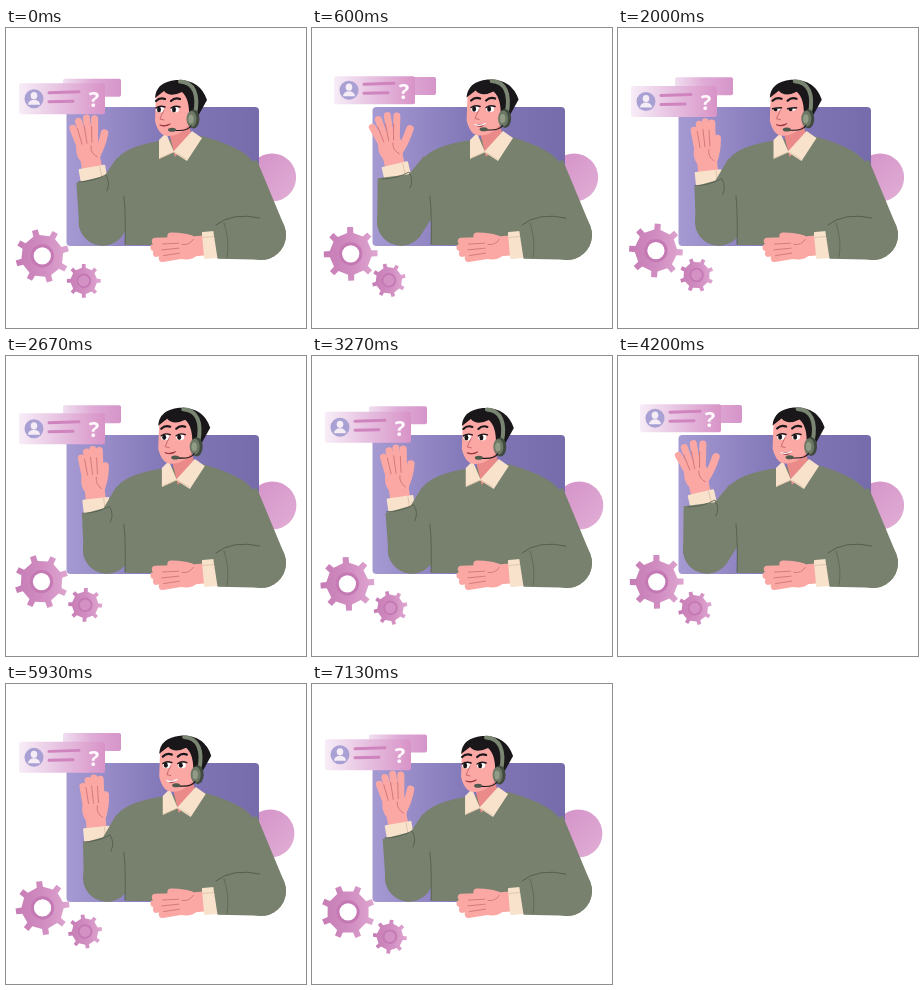
Recreate the animation shown at these times as an HTML page with a canvas. Size 300 by 300 pixels, loop 7190 ms.

```html
<!DOCTYPE html>
<html lang="en">
<head>
<meta charset="utf-8">
<title>Support agent</title>
<style>
html, body { margin: 0; width: 100%; height: 100%; overflow: hidden; background: #fff; }
canvas { display: block; width: 100vw; height: 100vh; }
</style>
</head>
<body>
<canvas id="stage"></canvas>
<script>
const canvas = document.getElementById('stage');
const c = canvas.getContext('2d');
const LOOP = 7190, CYCLE = LOOP / 2, TURN = 2 * Math.PI;
const SKIN = '#fba8a5', SHADE = '#ea8b8a', LINE = '#c8696e';
const CREAM = '#f8e2cc', SEAM = '#dcc0a4', INK = '#19171a', FOLD = '#525b4c';

const lerp = (a, b, k) => a + (b - a) * k;
const wave = (t, peak) => Math.cos((t - peak) / CYCLE * TURN);

// Eased value from [time, value] pairs, repeating every cycle.
function key(t, ...stops) {
  stops.push([CYCLE, stops[0][1]]);
  const i = stops.findIndex(s => s[0] > t);
  const [t0, a] = stops[i - 1], [t1, b] = stops[i];
  const k = (t - t0) / (t1 - t0);
  return lerp(a, b, k * k * (3 - 2 * k));
}

function gradient(x0, y0, x1, y1, ...colors) {
  const g = c.createLinearGradient(x0, y0, x1, y1);
  colors.forEach((col, i) => g.addColorStop(i / (colors.length - 1), col));
  return g;
}

function fill(path, color) {
  c.fillStyle = color;
  c.fill(new Path2D(path));
}

function stroke(path, color, width) {
  c.strokeStyle = color;
  c.lineWidth = width;
  c.stroke(new Path2D(path));
}

function oval(x, y, rx, ry, color) {
  c.beginPath();
  c.ellipse(x, y, rx, ry, 0, 0, TURN);
  c.fillStyle = color;
  c.fill();
}

function box(x, y, w, h, r, color) {
  c.beginPath();
  c.roundRect(x, y, w, h, r);
  c.fillStyle = color;
  c.fill();
}

function placed(x, y, angle, paint) {
  c.save();
  c.translate(x, y);
  c.rotate(angle);
  paint();
  c.restore();
}

// Tapered limb: flat at the first end, round at the second.
function limb(x0, y0, r0, x1, y1, r1, color) {
  placed(x0, y0, Math.atan2(y1 - y0, x1 - x0), () => {
    c.beginPath();
    c.moveTo(0, r0);
    c.lineTo(0, -r0);
    c.arc(Math.hypot(x1 - x0, y1 - y0), 0, r1, -TURN / 4, TURN / 4);
    c.fillStyle = color;
    c.fill();
  });
}

function gear(x, y, r, turn, hole) {
  placed(x, y, 0, () => {
    c.beginPath();
    for (let i = 0; i < 32; i++) {
      const edge = i % 4;
      const a = turn + (Math.floor(i / 4) + [-.19, -.14, .14, .19][edge]) * TURN / 8;
      const d = edge % 3 ? r : r * .78;
      c.lineTo(Math.cos(a) * d, Math.sin(a) * d);
    }
    c.closePath();
    c.fillStyle = gradient(-r, 0, r, 0, '#c67cb5', '#d08cc0', '#dfa6d1');
    c.fill();
    oval(0, 0, r * .43, r * .43, '#c579b4');
    oval(0, 0, r * .32, r * .32, hole);
  });
}

function cards(t) {
  const up = key(t, [0, 0], [605, 1], [1050, 0]);
  const shrink = key(t, [0, 0], [650, 0], [1100, 1], [1400, 1], [1850, 0]);
  const bx = 57 + 3 * up, bw = 58 + 6 * up;
  box(bx, 50 - 2 * up - wave(t, 2300), bw, 18, 2,
    gradient(bx, 0, bx + bw, 0, '#f0dff0', '#dfabd6', '#d594c8'));

  const x = 13 + 9 * up + 15 * shrink, w = 86 - 5 * up - 30 * shrink;
  const y = 56.5 + 1.5 * wave(t, 2100) - 7 * up - 3 * shrink, h = 31 - 3 * up;
  box(x, y, w, h, 2, gradient(x, 0, x + w, 0, '#f7edf7', '#e6bfe0', '#d893c7'));
  placed(x, y + h / 2, 0, () => {
    c.globalAlpha = 1 - shrink;
    oval(15, 0, 9.5, 9.5, '#a9a0d3');
    oval(15, -3, 3.3, 3.6, '#f6ecf6');
    fill('M9 6A6 5 0 0 1 21 6Z', '#f6ecf6');
    stroke('M30 -6L60 -7M30 3L54 2.5', '#cf84be', 3);
    c.fillStyle = '#fff8fd';
    c.font = 'bold 22px "Open Sans", "Liberation Sans", sans-serif';
    c.textAlign = 'center';
    c.fillText('?', w - 11, 8.5);
  });
}

// Hand pointing up from its wrist; spread opens the fingers and thumb.
function hand(x, y, tilt, spread) {
  placed(x, y, tilt, () => {
    oval(0, -23, 12.5, 15, SKIN);
    box(-10, -20, 20, 22, 2, SKIN);
    stroke(`M7 -17Q${11 + 4 * spread} -24 ${12 + 11 * spread} -37`, SKIN, 7.5);
    for (let i = 0; i < 4; i++) {
      const a = (i - 1.6) * lerp(.05, .2, spread), len = 24 - 1.8 * (i - 2) ** 2;
      const bx = -8 + 5 * i, tx = bx + Math.sin(a) * len, ty = -31 - Math.cos(a) * len;
      stroke(`M${bx} -29L${tx} ${ty}`, SKIN, 7);
      if (i) stroke(`M${bx - 2.5} -30L${lerp(bx, tx, .7) - 3} ${lerp(-30, ty, .7)}`, LINE, .7);
    }
    stroke('M7 -15Q1 -20 3 -27', LINE, .7);
    box(-13.5, -6, 27, 16, 1, CREAM);
    stroke('M8 -5V9', SEAM, .8);
  });
}

function leftArm(t, wool) {
  const s = key(t, [0, .6], [605, 1], [1130, .93], [2000, .05], [2335, 0], [3270, .32]);
  const x = lerp(91, 84, s), y = lerp(149, 142, s);
  const ex = lerp(101, 89, s * s), ey = 193.5;
  hand(x, y, lerp(-.1, -.23, s), s);
  limb(128, 140, 20, ex, ey, 24, wool);
  limb(x - .5, y + 6, lerp(14, 18, s), ex, ey, 24, wool);
  stroke(`M${x - 14} ${y + 9}Q${x} ${y + 9} ${x + 13} ${y + 2}q5 8 1 16`, FOLD, .8);
}

function rightArm(t, wool) {
  const r = key(t, [0, 0], [680, 0], [1080, 1], [1350, 1], [1800, 0]);
  const x = lerp(203, 208, r), y = lerp(217, 207, r);
  const ex = 255 + 3 * r, ey = 207;
  hand(x, y, lerp(-1.66, -1.45, r), .35 * r);
  limb(231, 139, 21, ex, ey, 25, wool);
  limb(x + 6, y - 3, 17, ex, ey, 25, wool);
  stroke(`M${x + 7} ${y - 20}Q${x + 23} ${y - 33} 254 190`, FOLD, .9);
  stroke(`M${x + 15} ${y - 22}q6 18 3 34`, FOLD, .6);
}

function collar() {
  fill('M161 96H183L186 110L169 129Z', SHADE);
  fill('M160 105L153 112V131L168 124Z', CREAM);
  fill('M186 103L196 110L181 133L167 124Z', CREAM);
  stroke('M154 130L168 124L180 131', SEAM, .8);
}

function head(t, turn) {
  fill('M150 64L149 93Q153 109 163 108Q178 107 185 92V60Z', SKIN);
  fill('M149 70Q150 54 170 52Q194 51 201 72L191 90H183Q184 71 176 64Q164 70 158 63Z', INK);

  const lid = key(t, [0, 0], [1600, 0], [1950, 1], [2080, 1], [2250, 0]);
  const open = key(t, [0, 0], [605, .5], [850, .3], [1130, 1], [1450, .4], [1900, 0], [2335, .4], [2900, 0]);
  placed(turn * 3.5, 0, 0, () => {
    for (const x of [154, 169]) {
      stroke(`M${x - 4} 73Q${x} 69 ${x + 5} 71`, INK, 2.2);
      oval(x, 81.5, 4, 3 - 1.5 * lid, '#fff');
      oval(x - 1, 81.5 + lid / 2, 2, 2.7 - 1.3 * lid, INK);
      stroke(`M${x - 4} ${80 + lid}Q${x} ${77 + 3 * lid} ${x + 5} ${79 + lid}`, INK, 1.4);
    }
    stroke('M158 82Q155 88 154 91L158 92', LINE, 1);
    fill(`M154 97Q158 ${98 - 2 * open} 164 96Q160 ${100 + 5 * open} 154 97Z`, '#9c3945');
    stroke('M154 97Q159 99 164 96', open > .2 ? '#fff' : '#9c3945', 1.2);
  });

  stroke('M174 53.5C188 54 193 67 189 86', '#7b8672', 4);
  oval(187.5, 91, 6, 9.5, '#414a3f');
  oval(185.5, 91, 5, 8, '#6c7764');
  oval(185, 91, 2.7, 4.5, '#919b86');
  stroke('M185 98Q181 104 166 102', INK, 1.2);
  oval(166, 101.7, 4, 2, '#4f594c');
}

function draw(now) {
  const t = now % CYCLE;
  const scale = devicePixelRatio || 1;
  const w = Math.round(innerWidth * scale), h = Math.round(innerHeight * scale);
  if (canvas.width !== w || canvas.height !== h) { canvas.width = w; canvas.height = h; }
  c.setTransform(w / 300, 0, 0, h / 300, 0, 0);
  c.clearRect(0, 0, 300, 300);
  c.lineCap = c.lineJoin = 'round';

  // The wool is flat so that it stays even across the turned limbs.
  const wool = '#77816d';
  const turn = key(t, [0, 0], [605, 1], [1300, 1], [2000, .5], [2335, .75], [3270, .15]);
  const spin = t / CYCLE * TURN;

  const cx = 263.5 + 4 * wave(t, 3100);
  oval(cx, 149.5, 24, 24, gradient(cx - 20, 130, cx + 20, 170, '#d493c8', '#e0acd5'));
  box(60.5, 79, 192.5, 139, 4, gradient(60, 0, 253, 0, '#a59ad2', '#8378b8', '#766cac'));
  cards(t);
  gear(37.5 - 2.4 * wave(t, 3000), 225 + 3 * wave(t, 3450), 27, spin + .5, '#fff');
  gear(78 + 1.2 * wave(t, 2600), 250 + 3 * wave(t, 200), 17, -spin, '#d391c4');

  leftArm(t, wool);
  fill('M153 113Q110 120 107 140L119 172V217H235L250 140Q246 122 196 108Z', wool);
  stroke('M118 168Q120 190 119 216', FOLD, .8);
  rightArm(t, wool);

  placed(turn * 5, 0, 0, collar);
  placed(turn * 5.6, -turn / 2, 0, () => head(t, turn));
}

const start = performance.now();
function tick() {
  draw((performance.now() - start) % LOOP);
  requestAnimationFrame(tick);
}
tick();
</script>
</body>
</html>
```
